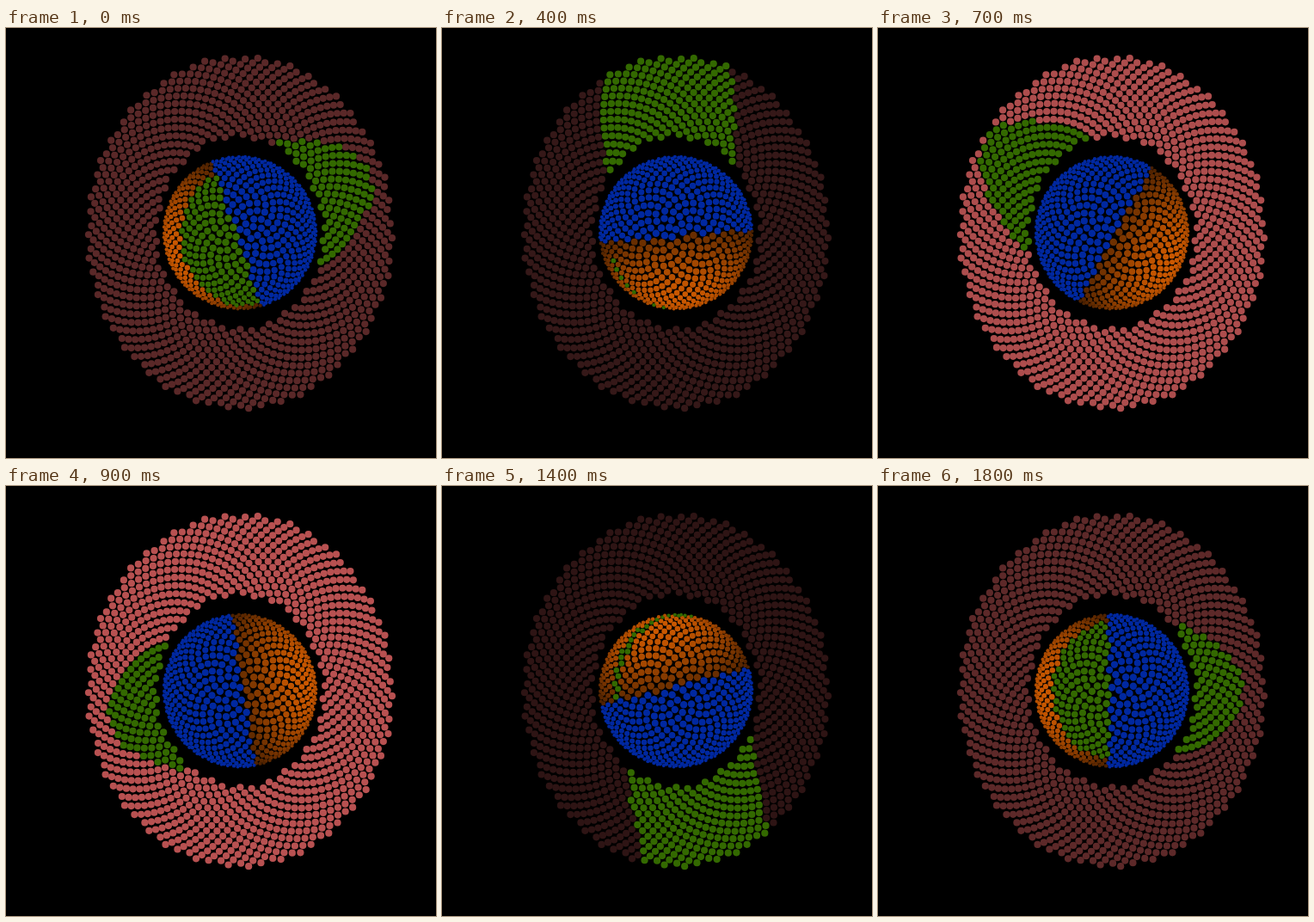
These frames come from a looping animation (500x500 px, 1900 ms). An HTML page with a canvas:

```html
<!DOCTYPE html>
<html>
<head>
<meta charset="utf-8">
<style>
  html, body { margin: 0; height: 100%; overflow: hidden; background: #000; }
  canvas { display: block; }
</style>
</head>
<body>
<canvas id="stage" width="500" height="500"></canvas>
<script>
const ctx = document.getElementById('stage').getContext('2d');
const CX = 272, CY = 238, R = 88.5;
const GOLDEN = Math.PI * (3 - Math.sqrt(5)), PHASE = 1.557;
const SPHERE_DOTS = 560;
const RING_FIRST = 441, RING_LAST = 1502, SPACING = 5.297;
const INNER = SPACING * Math.sqrt(RING_FIRST), OUTER = SPACING * Math.sqrt(RING_LAST);
const TILT = Math.PI / 6, NX = Math.sin(TILT), NZ = Math.cos(TILT);
const STEPS = 19, STEP_MS = 100;

// Golden-angle spirals: a hemisphere facing the viewer and a tilted flat ring.
const sphere = [], ring = [];
for (let n = 0; n < SPHERE_DOTS; n++) {
  const a = n * GOLDEN + PHASE;
  const z = 1 - (n + 0.5) / SPHERE_DOTS, r = R * Math.sqrt(1 - z * z);
  sphere.push({ x: r * Math.cos(a), y: r * Math.sin(a), z: R * z });
}
for (let n = RING_FIRST; n <= RING_LAST; n++) {
  const a = n * GOLDEN + PHASE, r = SPACING * Math.sqrt(n);
  ring.push({ x: r * NZ * Math.cos(a), y: r * Math.sin(a), z: -r * NX * Math.cos(a) });
}

function dot(p, radius, color) {
  ctx.fillStyle = color;
  ctx.beginPath();
  ctx.arc(CX + p.x, CY - p.y, radius, 0, 2 * Math.PI);
  ctx.fill();
}

const rgb = (r, g, b, k) => `rgb(${r * k},${g * k},${b * k})`;
const GREEN = 'rgb(51,105,0)', BLUE = 'rgb(0,40,160)';

function sphereColor(p, lx, ly) {
  const light = (p.x * lx + p.y * ly) / R;
  if (light < 0.05) return BLUE;
  // Follow the ray towards the sun to see whether the ring blocks it.
  const t = -(NX * p.x + NZ * p.z) / (NX * lx);
  const hit = Math.hypot(p.x + t * lx, p.y + t * ly, p.z);
  if (t > 0 && hit > INNER && hit < OUTER) return GREEN;
  return rgb(230, 100, 0, (0.42 + 0.75 * light) * (0.65 + 0.35 * p.z / R));
}

function ringColor(p, lx, ly) {
  const along = p.x * lx + p.y * ly;
  const across = Math.hypot(p.x * ly - p.y * lx, p.z);
  if (along < 0 && across < R) return GREEN;
  return rgb(185, 82, 82, Math.sqrt(Math.abs(lx)) * (lx > 0 ? 1 : 0.5));
}

function draw(now) {
  const step = Math.floor(now / STEP_MS) % STEPS;
  const a = Math.PI + 2 * Math.PI * (step + 1) / STEPS;
  const lx = Math.cos(a), ly = Math.sin(a);
  ctx.fillStyle = '#000';
  ctx.fillRect(0, 0, 500, 500);
  for (const p of ring) dot(p, 4.1, ringColor(p, lx, ly));
  for (const p of sphere) dot(p, 1.9 + 2.4 * p.z / R, sphereColor(p, lx, ly));
}

const start = performance.now();
function tick() {
  draw(performance.now() - start);
  requestAnimationFrame(tick);
}
tick();
</script>
</body>
</html>
```
